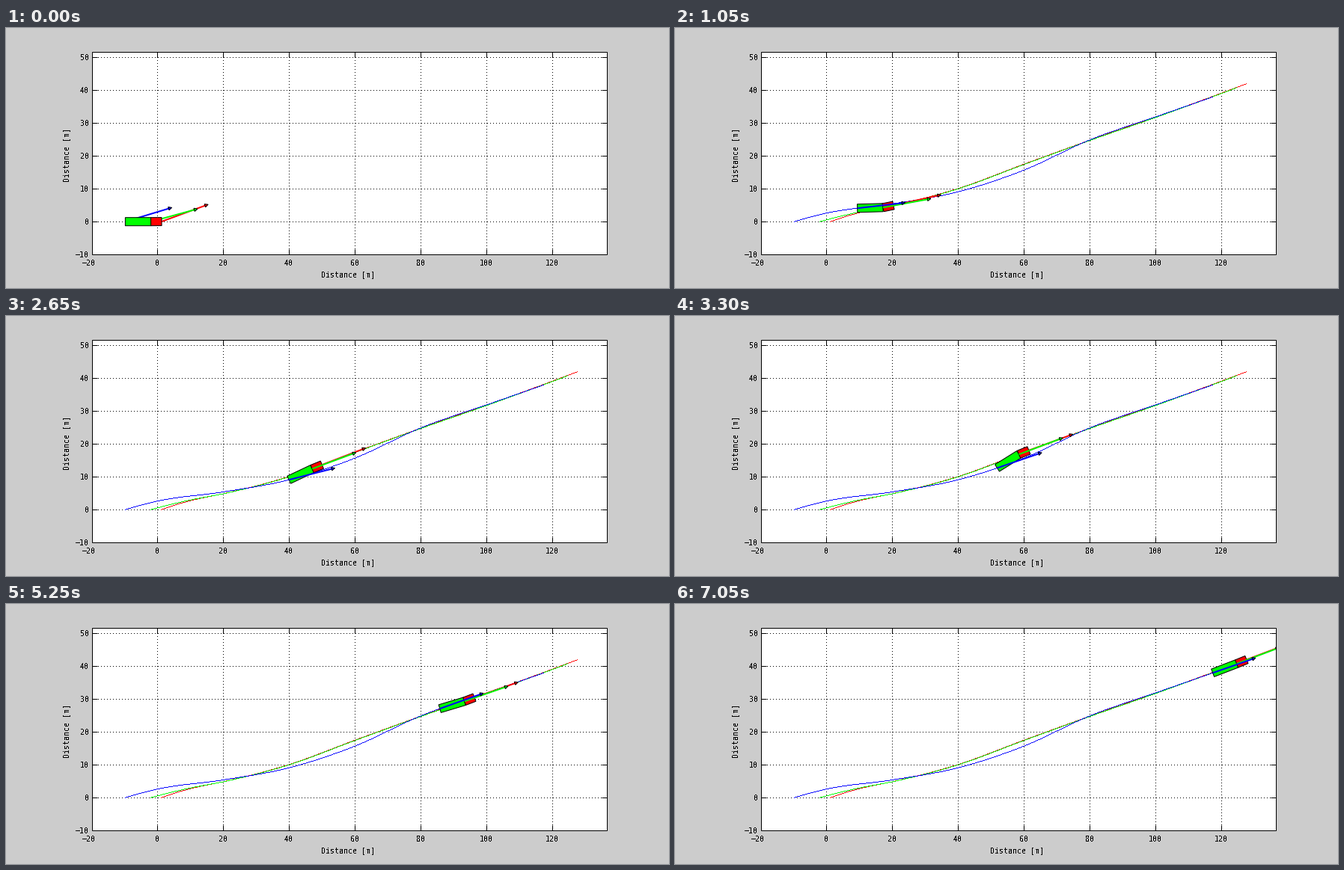
Recreate the animation shown at these times as a matplotlib script. Size 886 by 348 pixels, loop 7.1 s.

```python
import numpy as np
import matplotlib.pyplot as plt
from matplotlib.animation import FuncAnimation
from matplotlib.patches import Polygon, Rectangle

W, H, DPI = 886, 348, 100
PX = 72 / DPI                      # one pixel in points
SCALE, X0, Y0 = 4.4, 202.5, 259.2  # pixels per metre, plot origin
LEFT, TOP, RIGHT, BOTTOM = 115.5, 32.5, 803.5, 303.5
FRAMES, STEP = 142, 50
POSES = FRAMES - 1
TRAILER, TRACTOR, HALF_WIDTH = 7.8, 3.25, 1.25
RED, GREEN, BLUE = "#ff0000", "#00ff00", "#0000ff"

plt.rcParams.update({"text.antialiased": False, "path.snap": False,
                     "font.family": "DejaVu Sans Mono", "font.size": 10 * PX})


def smooth(*points):
    """Cubic Hermite curve through a few points."""
    x, y = np.array(points, float).T
    m = np.gradient(y, x, edge_order=2)

    def curve(q):
        i = np.clip(np.searchsorted(x, q) - 1, 0, len(x) - 2)
        h = x[i + 1] - x[i]
        t = (q - x[i]) / h
        rise = t * t * (3 - 2 * t)
        return (y[i] + rise * (y[i + 1] - y[i])
                + h * t * (1 - t) * ((1 - t) * m[i] - t * m[i + 1]))

    return curve


rear_road = smooth((-9.8, 0), (0, 2.6), (20, 5.4), (40, 9.1), (60, 15.7),
                   (80, 24.9), (100, 31.9), (117.3, 37.95))
hitch_road = smooth((-2, 0), (10, 2.95), (20, 4.85), (40, 10), (60, 17.4),
                    (80, 24.7), (100, 31.7), (124.6, 40.75))


def front_road(x):
    """The tractor's front starts lower and joins the hitch's road."""
    return hitch_road(x) + 0.1 - 1.1 * np.exp(-x / 8)


def drive(road, start, stop):
    """Move along the road, slowing down slightly."""
    x = np.linspace(start, stop, 2000)
    y = road(x)
    s = np.append(0, np.cumsum(np.hypot(np.diff(x), np.diff(y))))
    u = np.linspace(0, 1, POSES)
    u += 0.035 * u * (1 - u)
    xs = np.interp(u * s[-1], s, x)
    return np.column_stack([xs, road(xs)])


def lead(back, road, length):
    """Points on the road a fixed length ahead of back."""
    x, y = back.T
    ahead = x + length
    for _ in range(12):
        ahead = x + length * np.cos(np.arctan2(road(ahead) - y, ahead - x))
    return np.column_stack([ahead, road(ahead)])


def to_px(p):
    return np.array([X0, Y0]) + np.asarray(p) * [SCALE, -SCALE]


rear = drive(rear_road, -9.8, 117.3)
hitch = lead(rear, hitch_road, TRAILER)
front = lead(hitch, front_road, TRACTOR)

fig = plt.figure(figsize=(W / DPI, H / DPI), dpi=DPI, facecolor="#cccccc")
ax = fig.add_axes([0, 0, 1, 1])
ax.set_xlim(0, W)
ax.set_ylim(H, 0)
ax.axis("off")

area = (LEFT, TOP), RIGHT - LEFT, BOTTOM - TOP
ax.add_patch(Rectangle(*area, fc="white", ec="none", zorder=0))
border = ax.add_patch(Rectangle(*area, fc="none", ec="black", lw=PX, zorder=9))


def line(x, y, color="black", width=1, z=1, **kw):
    artist, = ax.plot(x, y, color=color, lw=width * PX, zorder=z,
                      solid_capstyle="butt", **kw)
    return artist


def label(x, y, text, **kw):
    ax.text(x, y, text, **{"ha": "center", "va": "center_baseline", **kw})


def name(m):
    return str(m).replace("-", "\u2212")


DOTS = {"ls": (0, (1, 3)), "dash_capstyle": "butt"}
for m in range(-20, 121, 20):
    x = np.floor(X0 + 0.3 + m * SCALE) + 0.5
    label(x - (3.5 if m < 0 else 0.5), 313.5, name(m))
    if m > -20:
        line([x, x], [BOTTOM + 0.5, TOP], **DOTS)
        line([x, x], [BOTTOM, BOTTOM - 7])
        line([x, x], [TOP, TOP + 7])
for m in range(-10, 51, 10):
    y = np.floor(Y0 - m * SCALE) + 0.5
    label(111, y - 0.5, name(m), ha="right")
    if m > -10:
        line([LEFT - 0.5, RIGHT], [y, y], **DOTS)
        line([LEFT, LEFT + 7], [y, y])
        line([RIGHT, RIGHT - 7], [y, y])
label(457.5, 329, "Distance [m]")
label(81.5, 169.5, "Distance [m]", rotation=90, va="center")


def crisp(points, color, z):
    """A path one pixel high in every column."""
    px, py = to_px(points).T
    x = np.arange(np.floor(px[0]), np.ceil(px[-1]))
    y = np.floor(np.interp(x + 0.5, px, py)) + 0.5
    return ax.hlines(y, x, x + 1, colors=color, lw=PX, zorder=z)


def shape(color, z):
    patch = ax.add_patch(Polygon(np.zeros((3, 2)), fc=color, ec="black",
                                 lw=PX, zorder=z, joinstyle="miter"))
    patch.set_clip_path(border)
    return patch


paths, arrows = [], []
for k, (points, color) in enumerate([(front, RED), (hitch, GREEN), (rear, BLUE)]):
    paths.append(crisp(points, color, 2 + k / 10))
    shaft = line([], [], color, 2, 5 + k / 10)
    shaft.set_clip_path(border)
    tips = points + 15 * np.gradient(points, axis=0)
    arrows.append((shaft, shape(color, 5.05 + k / 10), to_px(points), to_px(tips)))

trailer, tractor = shape(GREEN, 4), shape(RED, 4)


def axes_of(a, b):
    """Unit vectors along and across the way from a to b."""
    d = (b - a) / np.hypot(*(b - a))
    return d, np.array([-d[1], d[0]])


def place_box(patch, a, b):
    n = axes_of(a, b)[1] * HALF_WIDTH
    patch.set_xy(to_px([a + n, b + n, b - n, a - n]))


def draw(i):
    # the opening picture has no paths, and the truck covers its arrows
    pose = max(i - 1, 0)
    for path in paths:
        path.set_visible(i > 0)
    for patch in (trailer, tractor):
        patch.set_zorder(4 if i else 7)
    place_box(trailer, rear[pose], hitch[pose])
    place_box(tractor, hitch[pose], front[pose])
    for shaft, head, starts, tips in arrows:
        a, b = starts[pose], tips[pose]
        d, n = axes_of(a, b)
        base = b - 4.5 * d
        shaft.set_data(*np.array([a, base]).T)
        head.set_xy([b, base + 2.2 * n, base - 2.2 * n])
    return []


anim = FuncAnimation(fig, draw, frames=FRAMES, interval=STEP, repeat=True,
                     repeat_delay=0, init_func=lambda: draw(0), blit=False)
plt.show()
```
